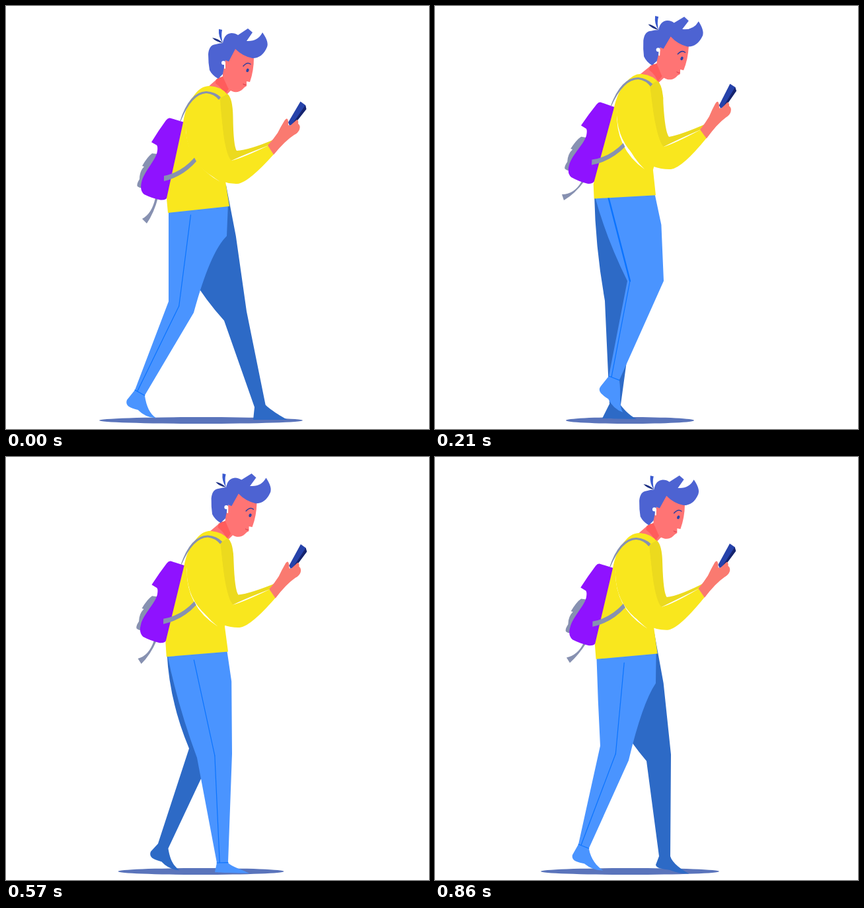
Recreate the animation shown at these times as an HTML page. Size 640 by 640 pixels, loop 930 ms.

```html
<!DOCTYPE html>
<html lang="en">
<head>
<meta charset="utf-8">
<title>Walking with a phone</title>
<style>
  html, body { margin: 0; width: 100%; height: 100%; overflow: hidden; background: #fff; }
  svg { display: block; width: 100%; height: 100%; }
  .skin { fill: #ff7474; }
  .hair { fill: #4d63d2; }
  .grey { fill: #8791b1; }
  .line { fill: none; stroke-linecap: round; }
</style>
</head>
<body>
<svg viewBox="0 0 640 640">
  <ellipse id="shadow" cx="295" cy="627" ry="5" fill="#5a74bb"/>
  <path id="farLeg" fill="#2d6ac6"/>
  <path id="nearLeg" fill="#4a94ff"/>
  <path id="thighStripe" class="line" stroke="#0b74ff"/>
  <path id="shinStripe" class="line" stroke="#0b74ff" stroke-width="1.2"/>

  <path id="tail" class="grey"/>
  <g id="bag">
    <path class="grey" d="M230,224L221,223Q214,228 206,242L209,243Q202,250 202,262Q197,270 199,273Q203,276 207,275L222,250Z"/>
    <path fill="#8f12ff" d="M248,169.500L270,176L252,280L245,288Q243,294 234,293.500Q221,291 209,285Q202,279 205,267C208,251 228,232 229,219Q230,211 227,210L220,206Q231,188 242,173Q245,169 248,169.500Z"/>
  </g>

  <g id="head">
    <path class="skin" d="M304,124L323,107L342,126L332,136L318,130Z"/>
    <path fill="#ff5c5c" d="M318,111L329,106L338,124L331,134Q327,124 317,117Z"/>
    <path class="skin" d="M347,62L375,78Q375,98 369,115L364,114L364,121Q360,123 358,126Q353,131 345,130Q337,128 335,122L328,107L328,90Q336,74 347,62Z"/>
    <path class="hair" d="M328,56Q330,42 341,41Q347,41 351,44L366,34L373,40L364,53Q381,54 388,40Q398,54 395,62Q388,79 373,79Q358,76 347,65L337,84L332,82L328,103L321,110Q312,105 308,97Q306,86 306,73Q307,59 317,58Q324,56 328,56Z"/>
    <path fill="#3a5ad0" d="M322,35L327,36Q325,45 328,56Q321,47 322,35Z"/>
    <path fill="#1c2f83" d="M312,48Q321,49 328,56Q317,54 312,48Z"/>
    <path class="line" stroke="#2d3f9f" stroke-width="1.500" d="M359,91Q365,84 370,88"/>
    <ellipse cx="365.500" cy="97.300" rx="2" ry="2.800" fill="#2a45a6" transform="rotate(18 365.500 97.300)"/>
    <path class="line" stroke="#e04552" stroke-width="1.200" d="M359,118Q361,120 363,119"/>
    <circle cx="329" cy="86" r="3" fill="#fff"/>
    <path class="line" stroke="#fff" stroke-width="2" d="M331,87V94"/>
  </g>

  <path id="torso" fill="#f9e71e" d="M245,313L243,291L268,176Q272,150 284,136Q294,121 308,121Q326,122 335,134L342,155L340,230L332,265L338,303Z"/>
  <path id="farArm" fill="#ecda1e"/>
  <path id="gap" fill="#fff"/>
  <path id="nearArm" fill="#f9e71e"/>
  <g id="straps" class="grey">
    <path d="M263,175Q277,130 303,129Q317,130 325,138L322,142Q315,133 303,132Q281,133 264.500,174Z"/>
    <path d="M239,257Q265,252 285,229.500L288,235Q268,258 239,265Z"/>
  </g>
  <g id="hand">
    <path fill="#2642aa" d="M445.500,144.500L453,150L454,156L437,178L429,181L427,176Z"/>
    <path fill="#15246f" d="M453,150L454.500,156L437,178L433,179Z"/>
    <path fill="#fa7a70" d="M396,211Q405,201 411,192Q416,182 421,174Q424,169 426,171Q428,175 427,180L430,181L440,172Q443,173 442,178Q446,181 444,187Q442,192 436,195Q422,204 405,225Z"/>
  </g>
</svg>
<script>
const STEPS = 13, HALF = STEPS / 2, LOOP = 930;
const el = id => document.getElementById(id);
const clamp = v => Math.max(0, Math.min(1, v));

// phase, back knee, front knee, ankle, heel, foot angle
const GAIT = [
  [0, 246, 447, 284, 464, 195, 581, 183, 596, 32],
  [1, 261, 437, 304, 452, 218, 575, 206, 589, 43],
  [1.5, 277, 441, 310, 455, 230, 585, 219, 597, 33],
  [3, 291, 416, 346, 416, 263, 560, 251, 575, 50],
  [3.5, 290, 430, 343, 436, 266, 578, 255, 588, 38],
  [5, 308, 445, 359, 429, 317, 588, 312, 602, 30],
  [5.5, 320, 460, 357, 450, 339, 604, 334, 617, 15],
  [6.5, 330, 476, 364, 462, 376, 607, 374, 626, 0],
  [7.5, 305, 470, 343, 455, 340, 611, 335, 629, 0],
  [8, 289, 455, 342, 449, 319, 614, 316, 628, 2],
  [9.5, 257, 446, 302, 450, 264, 602, 253, 624, 1],
  [10, 255, 425, 310, 450, 261, 610, 257, 624, 3],
  [11.5, 251, 447, 301, 433, 230, 596, 217, 607, 23],
  [12, 250, 437, 293, 459, 217, 586, 208, 602, 27]
];
GAIT.push([STEPS, ...GAIT[0].slice(1)]);

// the hand trails the body a little
const LIFT = [[0, 0], [1, .25], [1.5, .46], [3, 1], [3.5, 1], [5, .68], [5.5, .5], [HALF, 0]];

function sample(keys, p) {
  const n = keys.findIndex(key => key[0] > p);
  const a = keys[n - 1], b = keys[n];
  const f = (p - a[0]) / (b[0] - a[0]);
  return a.slice(1).map((v, i) => v + (b[i + 1] - v) * f);
}

function ankleFront([bx, by, fx, fy, ax, ay]) {
  const dx = ax - (bx + fx) / 2, dy = ay - (by + fy) / 2, len = Math.hypot(dx, dy);
  return [ax + 17 * dy / len, ay - 17 * dx / len];
}

function legPath(pose, hip, top, seat, bend) {
  const [bx, by, fx, fy, ax, ay, hx, hy, deg] = pose;
  const [cx, cy] = ankleFront(pose);
  const r = deg * Math.PI / 180, s = Math.min(1, deg / 30);
  const foot = (x, y) =>
    `${hx + x * Math.cos(r) - y * Math.sin(r)},${hy + x * Math.sin(r) + y * Math.cos(r)} `;
  const wx = 334 + .3 * Math.max(0, fx - 318), wy = seat + 45;
  const hollow = 34 * clamp((wx - fx) / 50);
  return `M${hip}Q${hip[0] + bend * (bx - hip[0])},${(hip[1] + by) / 2} ${bx},${by}` +
    `L${ax},${ay}L${hx},${hy}` +
    `C${foot(2, 10 * s)}${foot(12, 7 * s)}${foot(22, 4 * s)}Q${foot(38, 8 * s)}${foot(52, 0)}` +
    `C${foot(40, 5 * s - 6)}${cx + 3},${cy + 4 + 14 * s} ${cx},${cy}L${fx},${fy}` +
    `Q${(fx + wx) / 2},${(fy + wy) / 2 - hollow} ${wx},${wy}L${top}Z`;
}

function drawLegs(i, k) {
  const left = [245 - 5 * k, 313 - 22 * k], right = [337 - 4 * k, 303 - 17 * k];
  const hip = [left[0] + 1, left[1] - 6], seat = right[1];
  const near = sample(GAIT, i), far = sample(GAIT, (i + HALF) % STEPS);
  el('farLeg').setAttribute('d', legPath(far, hip, [right[0] - 4, seat - 32], seat, .1));
  el('nearLeg').setAttribute('d', legPath(near, hip, [right[0] - 1, seat - 4], seat, .35));

  const swing = Math.sin(2 * Math.PI * (i - .4) / STEPS);
  const x = 276.5 - 15.5 * swing, f = (x - 258) / 52;
  const [bx, by, fx, fy, ax, ay] = near, [cx, cy] = ankleFront(near);
  const knee = `${bx + (fx - bx) * f},${by + (fy - by) * f}`;
  const thigh = el('thighStripe');
  thigh.setAttribute('d', `M${x},${left[1] + 2 - 6 * swing}L${knee}`);
  thigh.setAttribute('stroke-width', 1.2 + 1.3 * Math.max(0, swing));
  el('shinStripe').setAttribute('d',
    `M${knee}L${ax + (cx - ax) * .25},${ay + (cy - ay) * .25}M${ax},${ay}L${cx},${cy}`);
}

function drawBody(k, h) {
  const move = (id, dx, dy) => el(id).setAttribute('transform',
    `translate(${(dx - 4.2) * k} ${(dy - 19.2) * k}) rotate(${2.85 * k} 291 308)`);
  move('torso', 0, 0);
  move('head', 1.8, -2.7);
  move('bag', 0, -2.7);
  move('straps', 0, -2.7);
  el('hand').setAttribute('transform', `translate(${5 * h} ${-24 * h}) rotate(${-3.5 * h} 397 211)`);

  const at = (x, y, dx, dy, w = k) => `${x + dx * w},${y + dy * w} `;
  const wrist = at(397, 211, 5, -24, h), cuff = at(405, 224.5, 6, -25, h);
  const inner = at(341, 234, 5, -21);
  el('farArm').setAttribute('d',
    `M${at(323, 140, 2, -20)}L${at(335, 133, 1, -20)}Q${at(343, 139, 2, -20)}${at(343.5, 168, 2, -20)}` +
    `Q${at(344, 212, 4, -21)}${at(349, 219, 5, -21)}Q${at(368, 218, 4, -23)}${at(408, 201, 5, -24, h)}` +
    `L${wrist}Q${at(360, 225, 5, -22)}${inner}Q${at(331, 234, 4, -21)}${at(329, 195, 3, -20)}Z`);
  el('nearArm').setAttribute('d',
    `M${at(324, 141, 1, -20)}Q${at(329, 222, 5, -21)}${inner}Q${at(358, 230, 5, -22)}${wrist}` +
    `L${cuff}Q${at(366, 268, 8, -23)}${at(350, 269, 7, -22)}Q${at(325, 270, 6, -22)}${at(300, 249, 5, -20)}` +
    `Q${at(273, 225, 4, -20)}${at(272, 185, 3, -20)}Q${at(272, 142, 3, -20)}${at(295, 132, 3, -20)}Z`);
  el('gap').setAttribute('d',
    `M${at(272, 177, 3, -20)}Q${at(270.5, 236, 2, -20)}${at(324, 266, -7, -19)}` +
    `Q${at(276, 235, 8, -20)}${at(272, 177, 3, -20)}Z`);
  el('tail').setAttribute('d',
    `M${at(226, 290, -4, -25)}Q${at(221, 314, -10, -29, h)}${at(206, 322, -14, -37, h)}` +
    `L${at(213, 329, -18, -35, h)}Q${at(224, 313, -12, -29, h)}${at(230, 290, -4, -25)}Z`);
}

function draw(i) {
  const p = i % HALF, d = Math.min(p, HALF - p);
  el('shadow').setAttribute('rx', 154 - 19 * d);
  drawLegs(i, d / 3);
  drawBody(d / 3, sample(LIFT, p)[0]);
}

const startOf = i => 70 * i + (i > 3 ? 10 : 0) + (i > 10 ? 10 : 0);
let shown = -1;
function tick() {
  const t = performance.now() % LOOP;
  let i = STEPS - 1;
  while (startOf(i) > t) i--;
  if (i !== shown) draw(shown = i);
  requestAnimationFrame(tick);
}
tick();
</script>
</body>
</html>
```
